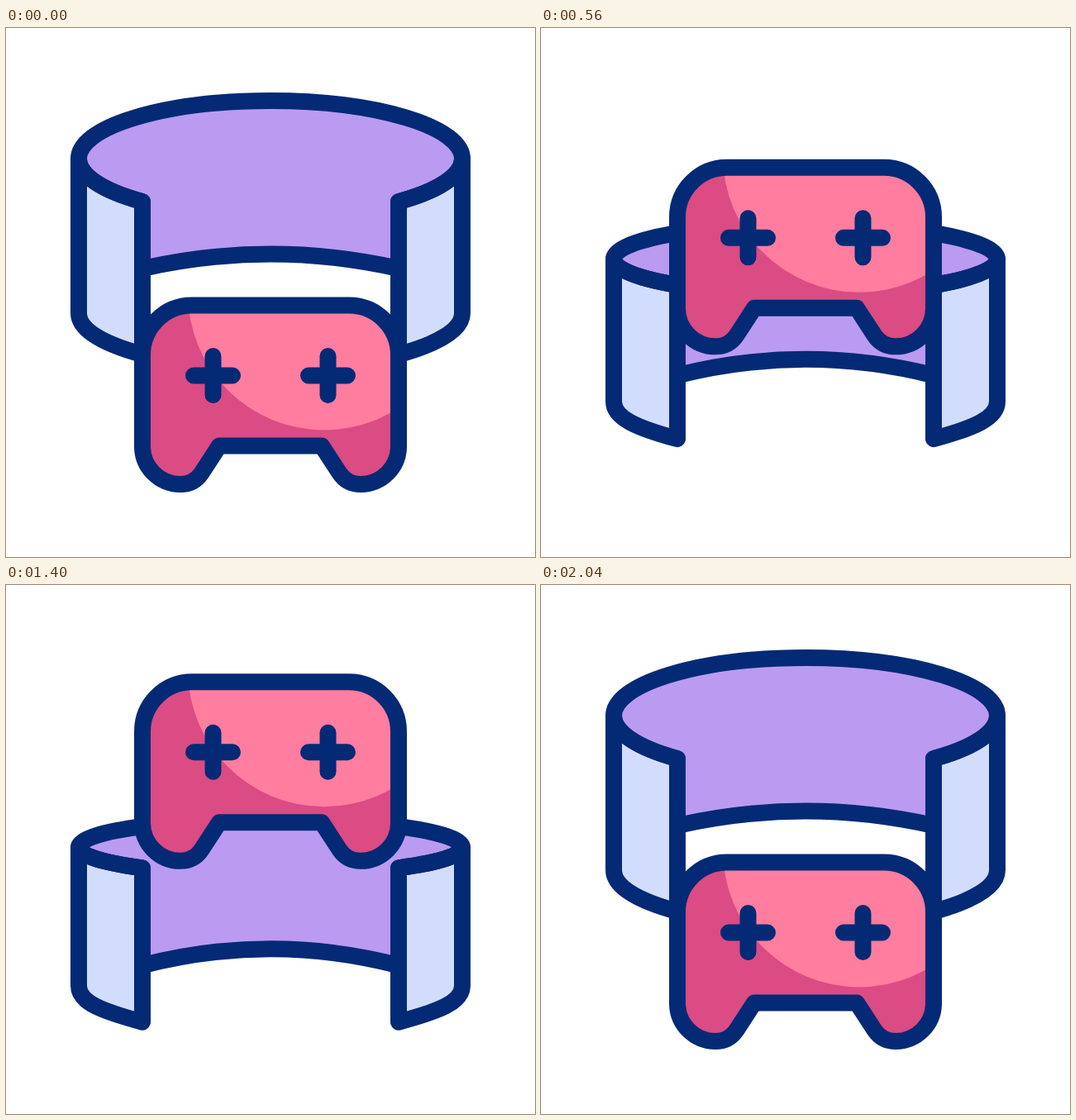
Write an HTML page that moves like this. It is 640x640 px and loops after 2120 ms.

```html
<!DOCTYPE html>
<html lang="en">
<head>
<meta charset="utf-8">
<title>Headset and gamepad</title>
<style>
  html, body { margin: 0; width: 100%; height: 100%; overflow: hidden; background: #fff; }
  svg { display: block; width: 100vw; height: 100vh; }
  .line { stroke: #042a75; stroke-width: 20; stroke-linecap: round; stroke-linejoin: round; }
</style>
</head>
<body>
<svg viewBox="0 0 640 640">
  <defs>
    <path id="shell" d="M225 335.5H415A60 60 0 0 1 475 395.5V506A46 46 0 0 1 429 552
      C418.500 552 409.500 547.500 403.500 538.500L382 505.500H258L236.500 538.500
      C230.500 547.500 221.500 552 211 552A46 46 0 0 1 165 506V395.5A60 60 0 0 1 225 335.5Z"/>
    <path id="cross" class="line" d="M-23.5 0H23.5M0 -23.5V23.5"/>
    <clipPath id="inside"><use href="#shell"/></clipPath>
  </defs>
  <path id="wall" fill="#bb9af2"/>
  <path id="hem" class="line" fill="none"/>
  <path id="panel" class="line" fill="#d2ddfd"/>
  <use href="#panel" transform="matrix(-1 0 0 1 640 0)"/>
  <path id="rim" class="line" fill="none"/>
  <g id="pad">
    <use href="#shell" fill="#db4b84"/>
    <circle cx="385" cy="321.7" r="164.8" fill="#ff7d9f" clip-path="url(#inside)"/>
    <use href="#shell" class="line" fill="none"/>
    <use id="left" href="#cross"/>
    <use id="right" href="#cross"/>
  </g>
</svg>
<script>
const LOOP = 2120, STEP = 40;
const LIFT = [[40, 0], [880, 1], [1280, 1], [2040, 0]];
const TILT = [[899, 0], [1008, 10], [1117, -10], [1230, 0]];
const SPIN = [[40, 0], [1080, 180]];

const $ = id => document.getElementById(id);
const set = (id, name, value) => $(id).setAttribute(name, value);

function ease(u) {
  return u < 0.5 ? (2 * u) ** 2.4 / 2 : 1 - (2 - 2 * u) ** 2.4 / 2;
}

function track(keys, t) {
  if (t <= keys[0][0]) return keys[0][1];
  for (let i = 1; i < keys.length; i++) {
    const [t0, a] = keys[i - 1], [t1, b] = keys[i];
    if (t < t1) return a + (b - a) * ease((t - t0) / (t1 - t0));
  }
  return keys[keys.length - 1][1];
}

// The band flattens as it sinks: each level moves at its own rate.
function drawBand(drop) {
  const side = 158 + drop;
  const ry = 70 - 0.228 * drop;
  const front = side + 0.744 * ry;
  const corner = 345 + 0.88 * drop;
  const foot = 395 + 0.84 * drop;
  const back = 291 + 1.063 * drop;
  const peak = 273.5 + 1.047 * drop;
  const rim = `M165 ${front}A232 ${ry} 0 0 1 88 ${side}A232 ${ry} 0 0 1 552 ${side}A232 ${ry} 0 0 1 475 ${front}`;
  const hem = `Q320 ${2 * peak - back} 165 ${back}`;
  set("rim", "d", rim);
  set("wall", "d", `${rim}V${back}${hem}Z`);
  set("hem", "d", `M475 ${back}${hem}`);
  set("panel", "d", `M165 ${front}A232 ${ry} 0 0 1 88 ${side}V${corner}` +
    `C88 ${corner + 20} 116 ${foot - 13.3} 165 ${foot}Z`);
}

function draw(t) {
  const lift = track(LIFT, t), spin = track(SPIN, t);
  drawBand(164.4 * lift);
  set("pad", "transform", `translate(0 ${-225.3 * lift}) rotate(${track(TILT, t)} 320 443.5)`);
  set("left", "transform", `translate(250.5 420.5) rotate(${spin})`);
  set("right", "transform", `translate(389.5 420.5) rotate(${-spin})`);
}

const start = performance.now();
function tick() {
  const t = (performance.now() - start) % LOOP;
  draw(Math.floor(t / STEP) * STEP);
  requestAnimationFrame(tick);
}
tick();
</script>
</body>
</html>
```
